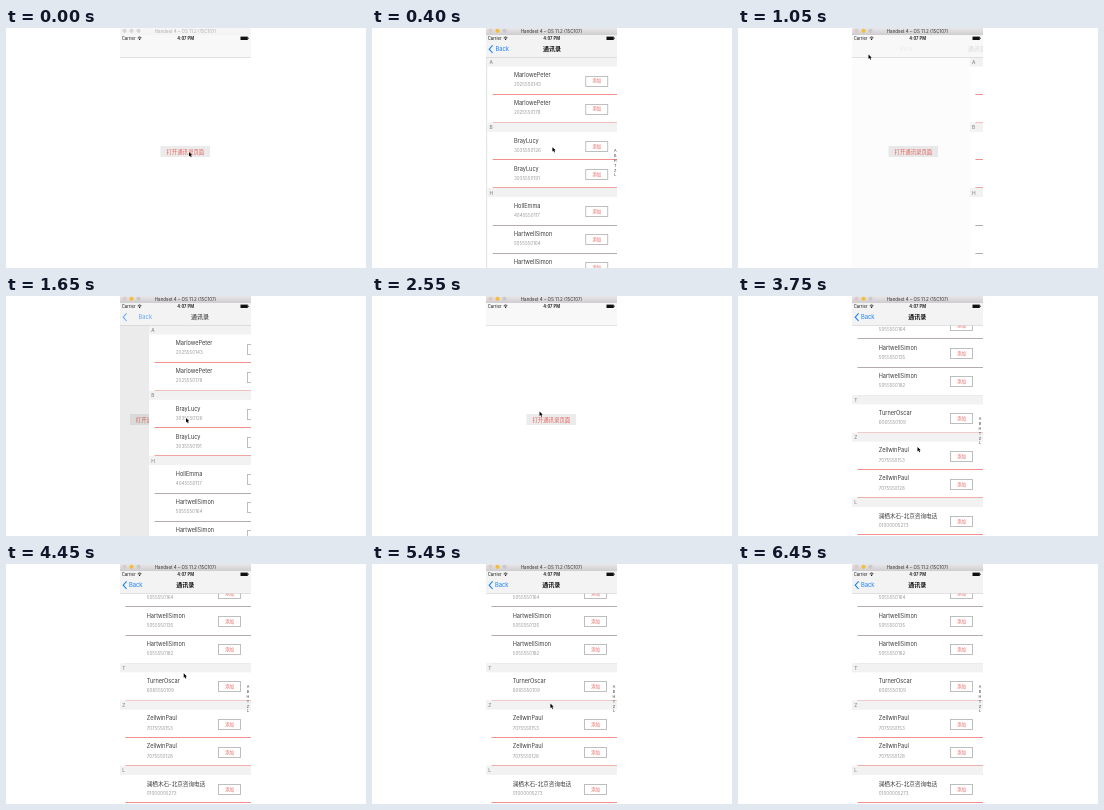
Write an HTML page with a canvas that moves like this. It is 360 px wide and 240 px high and loops after 6.5 s.

```html
<!DOCTYPE html>
<html lang="zh">
<head>
<meta charset="utf-8">
<title>Contacts demo</title>
<style>
html, body { margin: 0; width: 100%; height: 100%; overflow: hidden; background: #fff; }
canvas { display: block; width: 360px; height: 240px; }
</style>
</head>
<body>
<canvas id="stage"></canvas>
<script>
const LOOP = 6500, STEP = 50;
const LEFT = 114, WIDTH = 131, NAV_END = 29.2, ROW = 28, HEAD = 9.3;
const SANS = 'Inter, "Noto Sans CJK SC", "Noto Sans CJK", sans-serif';
const CJK = '"Noto Sans CJK SC", "Noto Sans CJK", sans-serif';
const RED = '#e4605a', PINK = '#f0918b', GRAY = '#b4acab', BLUE = '#167efb';

const sections = [
  ['A', PINK, ['MarlowePeter', '2025550143'], ['MarlowePeter', '2025550178']],
  ['B', PINK, ['BrayLucy', '3035550126'], ['BrayLucy', '3035550191']],
  ['H', GRAY, ['HollEmma', '4045550117'], ['HartwellSimon', '5055550164'],
              ['HartwellSimon', '5055550135'], ['HartwellSimon', '5055550182']],
  ['T', PINK, ['TurnerOscar', '6065550109']],
  ['Z', PINK, ['ZellwinPaul', '7075550153'], ['ZellwinPaul', '7075550128']],
  ['L', PINK, ['澜栖木石-北京咨询电话', '01000005273']]
];

// Page transitions: start, end, and whether the list page opens.
const moves = [[100, 480, true], [780, 1284, false], [1500, 1880, true],
               [2120, 2520, false], [2600, 2950, true]];

// Pointer: time, x, y
const path = [[0, 183, 124], [350, 183, 124], [720, 130.5, 26.5], [1070, 130.5, 26.5],
  [1420, 180, 122], [1700, 180, 122], [2050, 130.5, 26.5], [2250, 130.5, 26.5],
  [2550, 167.5, 115.5], [2750, 170, 122], [3050, 176.5, 172.5], [3400, 178, 110],
  [3750, 179.5, 151], [4150, 180, 145], [4450, 177.7, 109.3], [4950, 181, 124],
  [5600, 178, 142], [6250, 182, 136]];

const canvas = document.getElementById('stage');
const ctx = canvas.getContext('2d');
const ratio = window.devicePixelRatio || 1;
canvas.width = 360 * ratio;
canvas.height = 240 * ratio;

const clamp = v => Math.max(0, Math.min(1, v));
const smooth = v => v * v * (3 - 2 * v);
const easeOut = v => 1 - (1 - v) ** 3;

function rect(x, y, w, h, color) {
  ctx.fillStyle = color;
  ctx.fillRect(x, y, w, h);
}

function text(str, x, y, size, color, align = 'left', weight = 400, family = SANS) {
  ctx.font = `${weight} ${size}px ${family}`;
  ctx.textAlign = align;
  ctx.textBaseline = 'alphabetic';
  ctx.fillStyle = color;
  ctx.fillText(str, x, y);
}

function dot(x, y, r, color) {
  ctx.fillStyle = color;
  ctx.beginPath();
  ctx.arc(x, y, r, 0, Math.PI * 2);
  ctx.fill();
}

function openness(t) {
  let p = 0;
  for (const [from, to, opens] of moves) {
    if (t < from) break;
    const k = easeOut(clamp((t - from) / (to - from)));
    p = opens ? k : 1 - k;
  }
  return p;
}

function pointer(t) {
  for (let i = 1; i < path.length; i++) {
    const [t0, x0, y0] = path[i - 1], [t1, x1, y1] = path[i];
    if (t <= t1) {
      const k = smooth((t - t0) / (t1 - t0));
      return [x0 + (x1 - x0) * k, y0 + (y1 - y0) * k];
    }
  }
  return path[path.length - 1].slice(1);
}

function drawHome(p) {
  const x = -0.3 * WIDTH * p;
  rect(154.5 + x, 118, 49.5, 11, '#ebebeb');
  text('打开通讯录页面', 179.3 + x, 125.7, 5.4, RED, 'center', 400, CJK);
  if (p > 0) rect(LEFT, 7, WIDTH, 233, `rgba(0,0,0,${0.1 * p})`);
}

function drawRow(name, phone, line, x, y) {
  text(name, x + 26.7, y + 10.7, 5.6, '#3a3a3a');
  text(phone, x + 26.7, y + 19.8, 4.55, '#999');
  ctx.strokeStyle = '#b8b8b8';
  ctx.lineWidth = 0.9;
  ctx.strokeRect(x + 98.5, Math.round(y + 9) + 0.5, 22, 10);
  text('添加', x + 109.5, y + 15.8, 4.3, RED, 'center', 500, CJK);
  rect(x + 5.5, Math.round(y + ROW - 0.6), WIDTH - 5.5, 1, line);
}

function drawList(p, scroll) {
  const x = LEFT + WIDTH * (1 - p);
  rect(x, NAV_END, WIDTH, 211, '#fff');
  let y = NAV_END - scroll;
  for (const [letter, line, ...rows] of sections) {
    rect(x, y, WIDTH, HEAD, '#f2f2f2');
    text(letter, x + 2.2, y + 6.7, 4.9, '#777');
    y += HEAD;
    for (const [name, phone] of rows) {
      if (y > -ROW && y < 240) drawRow(name, phone, line, x, y);
      y += ROW;
    }
  }
  sections.forEach(([letter], i) =>
    text(letter, x + 128, 123.7 + i * 4.95, 3.8, '#444', 'center'));
}

function drawNav(p) {
  rect(LEFT, 7, WIDTH, 22.2, p > 0.5 ? '#f3f3f3' : '#f8f8f8');
  rect(LEFT, 29, WIDTH, 0.6, '#cfcfcf');
  if (p > 0) {
    ctx.globalAlpha = p * p;
    ctx.strokeStyle = BLUE;
    ctx.lineWidth = 1.1;
    ctx.beginPath();
    ctx.moveTo(120.6, 17.4);
    ctx.lineTo(117.2, 21.2);
    ctx.lineTo(120.6, 25);
    ctx.stroke();
    ctx.globalAlpha = 0.08 + 0.92 * p * p;
    text('Back', 123 + 43 * (1 - p), 23.3, 5.8, p > 0.6 ? BLUE : '#777');
    text('通讯录', 179.3 + 66 * (1 - p), 23.4, 6, '#111', 'center', 700, CJK);
    ctx.globalAlpha = 1;
  }
  text('Carrier', 115.8, 11.9, 4.2, '#111');
  ctx.strokeStyle = '#111';
  ctx.lineWidth = 0.7;
  for (const r of [1.4, 2.6]) {
    ctx.beginPath();
    ctx.arc(133.6, 11.6, r, -Math.PI * 0.77, -Math.PI * 0.23);
    ctx.stroke();
  }
  dot(133.6, 11.4, 0.6, '#111');
  text('4:07 PM', 179.7, 11.9, 4.2, '#111', 'center', 600);
  rect(234.5, 8.6, 7.3, 3.4, '#111');
  rect(242.1, 9.6, 0.6, 1.4, '#111');
}

function drawTitleBar(active) {
  const fill = ctx.createLinearGradient(0, 0, 0, 7);
  fill.addColorStop(0, active ? '#e8e6e8' : '#f7f7f7');
  fill.addColorStop(1, active ? '#cfcdcf' : '#f3f3f3');
  rect(LEFT, 0, WIDTH, 7, fill);
  const lights = active ? ['#dcc9c9', '#f5bd3c', '#c9c9c9'] : ['#d6d6d6', '#d6d6d6', '#d6d6d6'];
  lights.forEach((color, i) => dot(118.5 + i * 7, 2.8, 2.1, color));
  text('Handset 4 – OS 11.2 (15C107)', 179.5, 4.7, 4.5, active ? '#333' : '#adadad', 'center');
}

function drawPointer(x, y) {
  ctx.save();
  ctx.translate(x, y);
  ctx.scale(0.8, 0.8);
  ctx.beginPath();
  [[0, 0], [0, 5.6], [1.3, 4.5], [2.3, 6.7], [3.3, 6.2], [2.3, 4.1], [4.1, 4]]
    .forEach(([a, b]) => ctx.lineTo(a, b));
  ctx.closePath();
  ctx.strokeStyle = '#fff';
  ctx.lineWidth = 0.9;
  ctx.stroke();
  ctx.fillStyle = '#000';
  ctx.fill();
  ctx.restore();
}

function draw(t) {
  const p = openness(t);
  const scroll = 182 * smooth(clamp((t - 3150) / 550));
  ctx.setTransform(ratio, 0, 0, ratio, 0, 0);
  rect(0, 0, 360, 240, '#fff');
  ctx.save();
  ctx.beginPath();
  ctx.rect(LEFT, 0, WIDTH, 240);
  ctx.clip();
  if (p < 1) drawHome(p);
  if (p > 0) drawList(p, scroll);
  drawNav(p);
  drawTitleBar(t >= 100);
  ctx.restore();
  if (t < 6350) drawPointer(...pointer(t));
}

function tick() {
  draw(Math.floor(performance.now() % LOOP / STEP) * STEP);
  requestAnimationFrame(tick);
}
tick();
</script>
</body>
</html>
```
